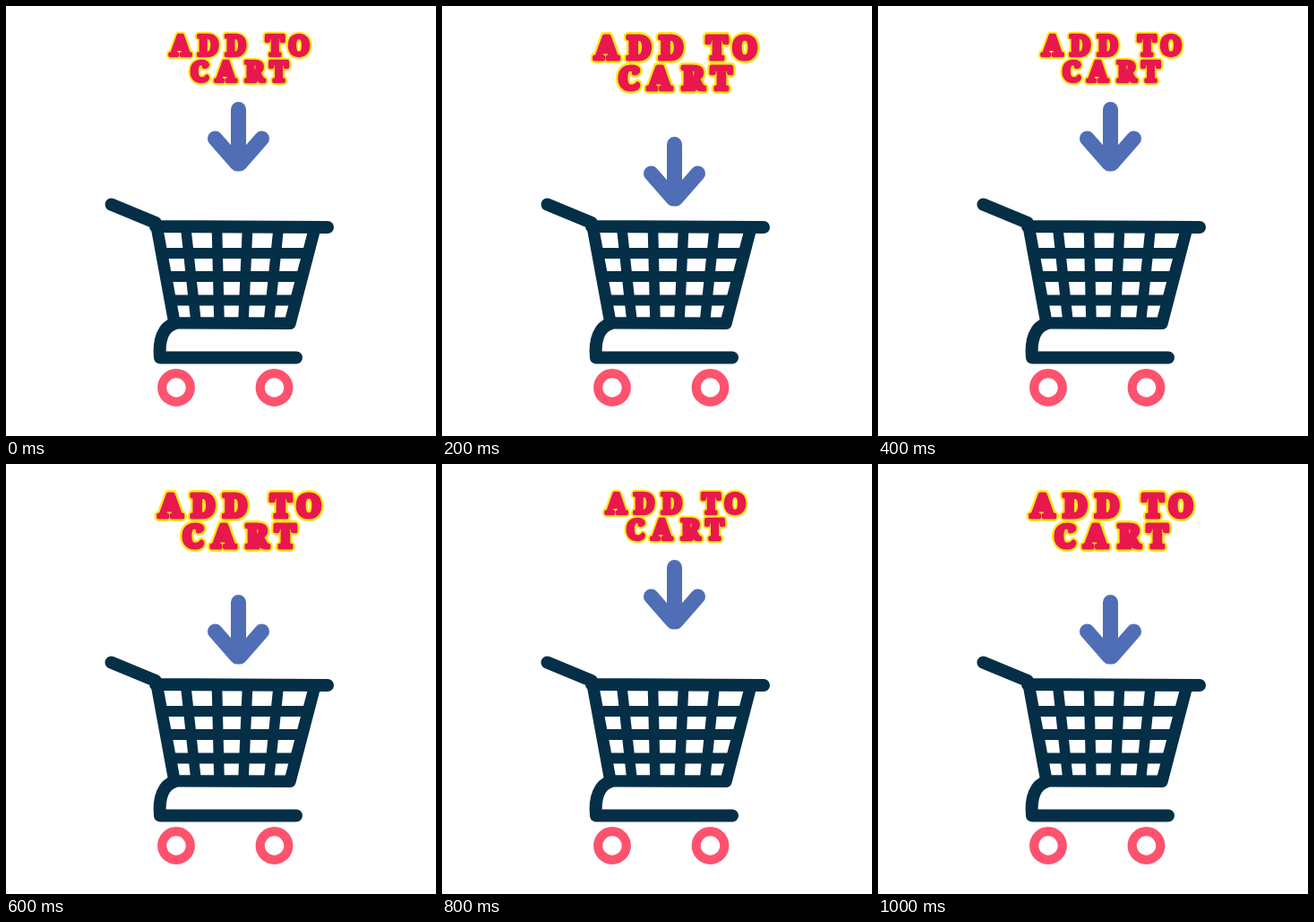
An HTML page for the animation above (1200 ms loop, 480 by 480 pixels).

```html
<!DOCTYPE html>
<html lang="en">
<head>
<meta charset="utf-8">
<title>Add to cart</title>
<style>
  html, body { margin: 0; width: 100%; height: 100%; overflow: hidden; background: #fff; }
  svg { display: block; width: 100%; height: 100%; }
  .lines { fill: none; stroke-linecap: round; stroke-linejoin: round; }
  text {
    font: 900 30px "Noto Serif", serif;
    text-anchor: middle;
    stroke-linejoin: round;
  }
  .edge { fill: #fee71c; stroke: #fee71c; stroke-width: 8.6; }
  .face { fill: #e8184f; stroke: #e8184f; stroke-width: 4.4; }
</style>
</head>
<body>
<svg viewBox="0 0 480 480">
  <defs>
    <g id="words">
      <text y="55.3" x="194.5 225.7 256.5 270 300.3 327">ADD TO</text>
      <text y="84.3" x="216 245.4 277.5 304.5">CART</text>
    </g>
  </defs>

  <g id="label">
    <use href="#words" class="edge"/>
    <use href="#words" class="face"/>
  </g>

  <path id="arrow" class="lines" stroke="#4f6eb6" stroke-width="17"
        d="M259.5 115.5V176M233.5 148L258 176H261L285.5 148"/>

  <g class="lines" stroke="#042f47">
    <path stroke-width="14" d="M117.5 221.5L167 242M167 246L359 247"/>
    <path stroke-width="13.4" d="M168 245L188 353.8L317 354.3L345 247"/>
    <path stroke-width="11.6" d="M201 250L212 352M235.5 250L238 352M269.5 250L265 352M304 250L293.5 352"/>
    <path stroke-width="12" d="M174 276H337M178 302H330M183 328.5H324"/>
    <path stroke-width="14" d="M188 354.5C176 358 170 372 172 392.5H324"/>
  </g>

  <g class="lines" stroke="#fe526e" stroke-width="10.2">
    <circle cx="190" cy="426" r="15.8"/>
    <circle cx="299.5" cy="426" r="15.8"/>
  </g>
</svg>
<script>
  const label = document.getElementById("label");
  const arrow = document.getElementById("arrow");
  const STEP = 200;

  // Two poses alternate: small label with arrow up, large label with arrow down.
  function draw(now) {
    const down = Math.floor(now / STEP) % 2;
    const scale = down ? 1.165 : 1;
    label.setAttribute("transform", `translate(260 30) scale(${scale}) translate(-260 -30)`);
    arrow.setAttribute("transform", `translate(0 ${down * 39})`);
  }

  let start;
  function tick(now) {
    start ??= now;
    draw(now - start);
    requestAnimationFrame(tick);
  }
  draw(0);
  requestAnimationFrame(tick);
</script>
</body>
</html>
```
